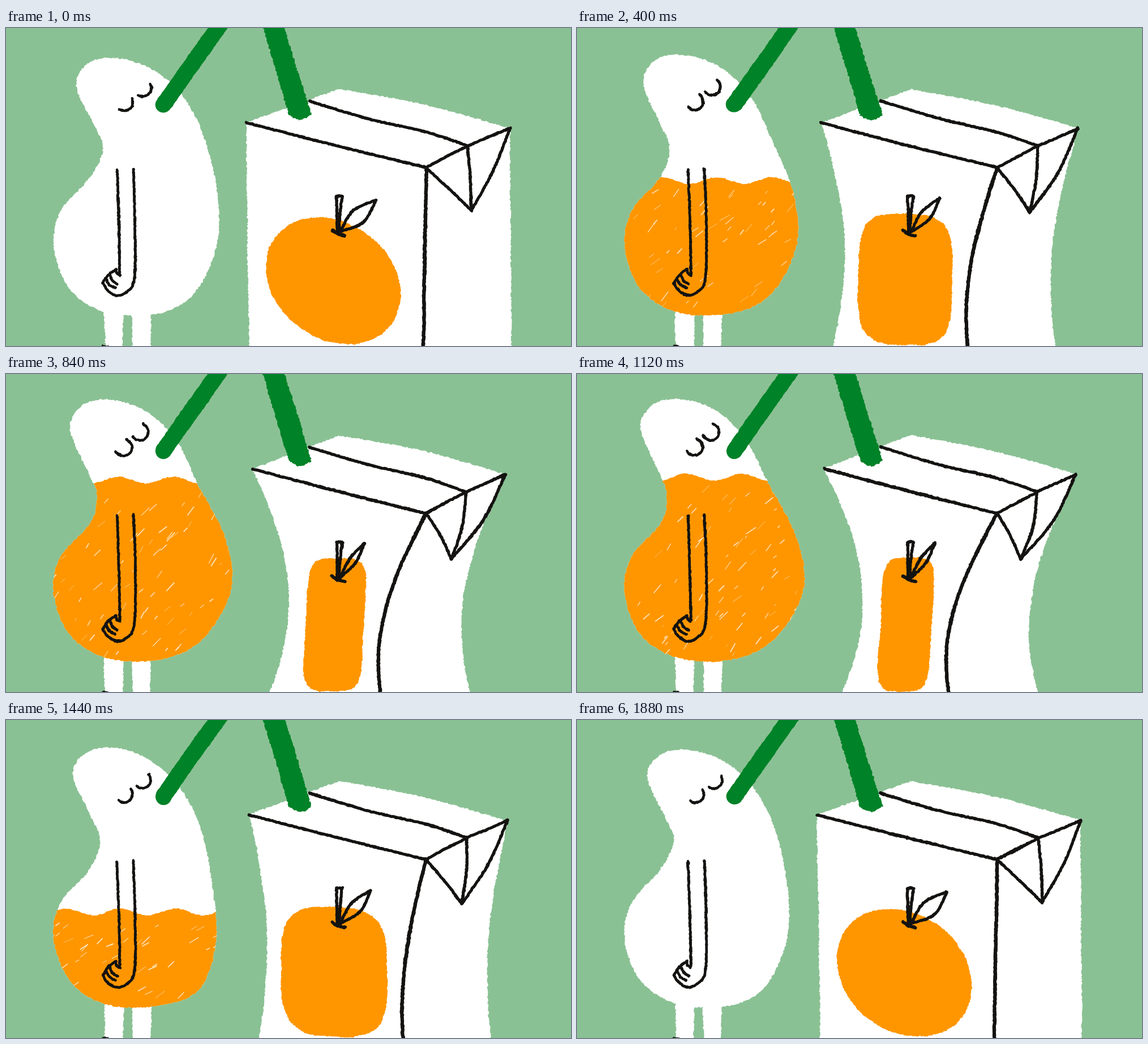
These frames come from a looping animation (998x561 px, 1920 ms). An HTML page with a canvas:

```html
<!DOCTYPE html>
<html lang="en">
<head>
<meta charset="utf-8">
<title>Juice break</title>
<style>
html, body { margin: 0; width: 100%; height: 100%; overflow: hidden; background: #8ac194; }
canvas { display: block; }
</style>
</head>
<body>
<canvas id="stage" width="998" height="561"></canvas>
<script>
const ctx = document.getElementById('stage').getContext('2d');
const WHITE = '#fff', INK = '#141311', ORANGE = '#ff9600', GREEN = '#008228', BACK = '#8ac194';
const LOOP = 1920, STEP = 40, FULL = 1120, RELEASE = 1200, FLOOR = 566;
const { PI, sin, cos, abs, sign, max, min, hypot, ceil, floor } = Math;

const BEAN = [[124, 100], [150, 60], [205, 54], [265, 77], [315, 125], [350, 195], [372, 285], [375, 370], [350, 443],
  [310, 488], [250, 507], [170, 499], [110, 457], [84, 385], [97, 322], [148, 263], [171, 212], [155, 170]];

let seed = 1;
function rand() {
  seed = (seed * 16807) % 2147483647;
  return seed / 2147483647;
}
const jig = r => (rand() * 2 - 1) * r;
const lerp = (a, b, k) => a + (b - a) * k;

// Catmull-Rom samples with a crayon-like jitter.
function curve(points, grain = 1.2, closed = false) {
  const pts = points.map(([x, y]) => [x + jig(0.8), y + jig(0.8)]), n = pts.length, out = [];
  const at = i => closed ? pts[(i + n) % n] : pts[max(0, min(n - 1, i))];
  for (let i = 0; i < (closed ? n : n - 1); i++) {
    const [a, b, c, d] = [at(i - 1), at(i), at(i + 1), at(i + 2)];
    const count = ceil(hypot(c[0] - b[0], c[1] - b[1]) / 2.5);
    for (let j = 0; j <= count; j++) {
      const u = j / count;
      out.push([0, 1].map(k => jig(grain) + b[k] + 0.5 * u * (c[k] - a[k] +
        u * (2 * a[k] - 5 * b[k] + 4 * c[k] - d[k] + u * (3 * (b[k] - c[k]) + d[k] - a[k])))));
    }
  }
  return out;
}

// Three points from a to b; a positive bow bulges clockwise.
function arc(a, b, bow = 0) {
  const dx = b[0] - a[0], dy = b[1] - a[1], k = bow / hypot(dx, dy);
  return [a, [a[0] + dx / 2 - dy * k, a[1] + dy / 2 + dx * k], b];
}

function path(pts) {
  const p = new Path2D();
  pts.forEach(([x, y]) => p.lineTo(x, y));
  return p;
}

const outline = parts => path(parts.flatMap(part => curve(part)));

function fill(p, color) {
  ctx.fillStyle = color;
  ctx.fill(p);
}

function ink(points, width = 5.5, color = INK) {
  ctx.strokeStyle = color;
  ctx.lineWidth = width - 0.8;
  for (let i = 0; i < 2; i++) ctx.stroke(path(curve(points, 0.8)));
}

function scratches(count, top) {
  const angle = -0.9 + jig(0.4);
  ctx.strokeStyle = 'rgba(255,255,255,.7)';
  for (let i = 0; i < count; i++) {
    const x = lerp(80, 400, rand()), y = lerp(top, 500, rand()), len = 4 + rand() * 16, a = angle + jig(0.25);
    ctx.lineWidth = 0.5 + rand() * 1.5;
    ctx.stroke(path([[x, y], [x + cos(a) * len, y + sin(a) * len]]));
  }
}

// The head leans back, the belly swells, and draining sucks the belly in again.
function bean(q, drain) {
  return BEAN.map(([x, y]) => {
    let dx = 0;
    if (y < 230) dx = -12 * q;
    else if (x > 300) dx = 26 * q * sin(PI * (y - 230) / 300) - 18 * drain * cos(PI * (y - 330) / 220);
    return [x + dx, y - 14 * q * max(0, 1 - y / 150)];
  });
}

function drawJuice(t, juice, body) {
  const level = 510 - 328 * juice, crest = 150 + 0.33 * (t - 400);
  const wave = [[60, FLOOR]];
  for (let x = 60; x <= 420; x += 3) wave.push([x, level - 6 * cos((x - crest) / 97 * 2 * PI) + jig(1)]);
  wave.push([420, FLOOR]);
  ctx.save();
  ctx.clip(body);
  fill(path(wave), ORANGE);
  scratches(80 * juice, level + 22);
  ctx.restore();
}

function drawArm() {
  ink(arc([196, 250], [201, 434], -1), 5);
  ink([[225, 248], [228, 340], [227, 440], [212, 466], [194, 471], [178, 461], [171, 450]], 5);
  ink(arc([171, 450], [194, 426], -3), 5);
  ink(arc([194, 426], [201, 437], 2), 5);
  for (let i = 0; i < 2; i++) ink(arc([183 - 6 * i, 435 + 8 * i], [197 - 4 * i, 452 + 7 * i], 3), 5);
}

function drawEye(x, y, open) {
  const points = [];
  for (let i = 0; i <= 6; i++) {
    const a = lerp(125 + 27 * open, -28 - 45 * open, i / 6) * PI / 180;
    points.push([x + 15 * cos(a), y + 15 * sin(a)]);
  }
  ink(points, 4.8);
}

function drawDrinker(t, q, juice, drain) {
  for (const x of [174, 223]) fill(outline([arc([x - 1, 490], [x + 1, FLOOR]), arc([x + 32, FLOOR], [x + 34, 490])]), WHITE);
  ink(arc([171, 561], [180, 562]), 4);

  const body = path(curve(bean(q, drain), 1.2, true));
  fill(body, WHITE);
  if (juice > 0.02) drawJuice(t, juice, body);
  drawArm();
  const e = q * (1 - drain / 2);
  drawEye(209 - 2 * e, 131 - 2 * e, e);
  drawEye(242 - 6 * e, 106 - 4 * e, e);
}

// An upright edge from the top down that caves in along part of a sine wave.
function sideEdge(top, bottom, y, cave, start, span) {
  return Array.from({ length: 8 }, (_, i) => {
    const u = i / 7;
    return [lerp(top, bottom, u) + cave * sin(PI * (start + span * u)), lerp(y, FLOOR, u)];
  });
}

function drawBox(q) {
  const left = sideEdge(424, 429, 167, 78 * q, 0.05, 0.79);
  const right = sideEdge(890, 892, 177, -93 * q, 0.03, 0.66);
  const front = sideEdge(742, 737, 246, -86 * q, 0, 0.62);
  const back = [589, 108], ridge = [815 - 2 * q, 208], tip = [822 - 38 * q, 322 + 5 * q];
  const [a, b, c] = [left[0], front[0], right[0]];

  fill(outline([[...left].reverse(), arc(a, back), arc(back, c, -7), right]), WHITE);
  ink(front, 6.5);
  ink([[536, 129], [640, 160], [740, 183], ridge]);
  ink(arc(a, b, 1));
  ink(arc(b, ridge));
  ink(arc(ridge, c));
  ink(arc(b, tip, -3 * q));
  ink(arc(tip, c, 5 + 6 * q));
  ink(arc(ridge, tip, -2 - 5 * q));
}

// A skewed superellipse that narrows, squares off and leans as the box caves in.
function drawFruit(q) {
  const rx = 119 - 69 * q ** 1.5, ry = 112 + 6 * q, power = 1 - 0.55 * q ** 0.5, points = [];
  const soft = v => sign(v) * abs(v) ** power;
  for (let i = 0; i < 60; i++) {
    const a = i / 60 * 2 * PI, v = soft(sin(a + 0.22 * (1 - q)));
    const waist = 1 - 0.1 * q * (1 - v * v);
    points.push([578 + 3 * q + rx * waist * soft(cos(a)) - 7 * q * v, 446 - 4 * q + ry * v]);
  }
  fill(path(curve(points, 1, true)), ORANGE);

  const root = [590, 359], tip = [653 - 21 * q, 304 - 6 * q];
  ink(arc([585, 358], [584, 297]));
  ink(arc([584, 297], [594, 297], -1));
  ink(arc([594, 297], [588, 360], 1));
  ink(arc([576, 357], [598, 366], 2), 6);
  ink(arc(root, tip, -13 + 8 * q));
  ink(arc(root, tip, 15 - 8 * q));
}

function drawStraw() {
  ink(arc([388, -20], [278, 135]), 28.5, GREEN);
  fill(outline([arc([448, -20], [500, 154]), arc([500, 154], [540, 153], 9), arc([540, 153], [486, -20])]), GREEN);
}

function draw(t) {
  const rising = t < RELEASE;
  const left = rising ? max(0, 1 - t / FULL) : (LOOP - t) / (LOOP - RELEASE);
  const squeeze = rising ? 1 - left ** 2 : left ** 2;
  const juice = rising ? 1 - left ** 3 : left ** 1.6;
  const drain = rising ? 0 : min((1 - left) * 3, left * 1.5);

  seed = 7919 * (t / STEP + 1);
  ctx.lineCap = ctx.lineJoin = 'round';
  ctx.fillStyle = BACK;
  ctx.fillRect(0, 0, 998, 561);
  drawDrinker(t, squeeze, juice, drain);
  drawBox(squeeze);
  drawFruit(squeeze);
  drawStraw();
}

let last = -1;
function tick() {
  let t = floor(performance.now() % LOOP / STEP) * STEP;
  if (t > FULL && t < RELEASE) t = FULL;
  if (t !== last) draw(last = t);
  requestAnimationFrame(tick);
}
tick();
</script>
</body>
</html>
```
